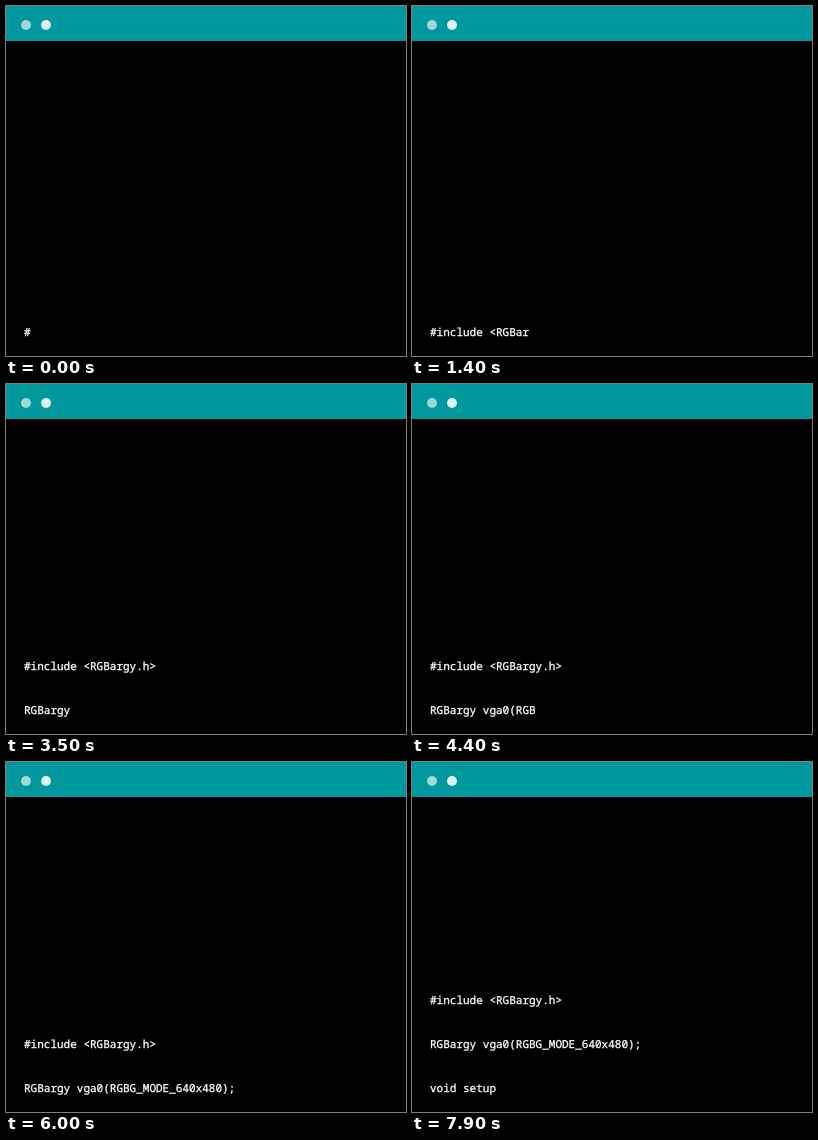
Animation, 400 px wide and 350 px high, one loop 8000 ms. Source, as an HTML page:

```html
<!DOCTYPE html>
<html lang="en">
<head>
<meta charset="utf-8">
<title>Typing a sketch</title>
<style>
  html, body { margin: 0; width: 100%; height: 100%; overflow: hidden; background: #000; }

  .bar { position: absolute; left: 0; top: 0; width: 400px; height: 35px; background: #00979d; }
  .dot { position: absolute; top: 14px; width: 10px; height: 10px; border-radius: 50%; }
  .dot.dim { left: 15px; background: #9fd7d8; }
  .dot.bright { left: 35px; background: #def2f2; }

  /* The small negative delay keeps every step just ahead of its tick. */
  .code, .line { animation: 8s -10ms infinite; }

  .code {
    position: absolute; left: 18px; top: 316px;
    font: 11px/22px "Noto Sans Mono", "DejaVu Sans Mono", monospace;
    text-rendering: geometricPrecision;
    color: #fff;
    -webkit-text-stroke: 0.3px #fff;
    animation-name: scroll;
    animation-timing-function: step-end;
  }
  .line { position: absolute; left: 0; height: 22px; overflow: hidden; white-space: pre; }
  .include { top: 0; animation-name: type-include; }
  .object { top: 44px; animation-name: type-object; }
  .setup { top: 88px; animation-name: type-setup; }

  @keyframes scroll {
    0% { top: 316px; }
    28.125% { top: 294px; }
    33.75% { top: 272px; }
    79.375% { top: 250px; }
    85%, 100% { top: 228px; }
  }
  /* One character every 100 ms. */
  @keyframes type-include {
    0% { width: 1ch; animation-timing-function: steps(19); }
    23.75%, 100% { width: 20ch; }
  }
  @keyframes type-object {
    0%, 35% { width: 0; animation-timing-function: steps(32); }
    75%, 100% { width: 32ch; }
  }
  @keyframes type-setup {
    0%, 86.25% { width: 0; animation-timing-function: steps(10); }
    98.75%, 100% { width: 10ch; }
  }
</style>
</head>
<body>
  <div class="code">
    <div class="line include">#include &lt;RGBargy.h&gt;</div>
    <div class="line object">RGBargy vga0(RGBG_MODE_640x480);</div>
    <div class="line setup">void setup</div>
  </div>
  <div class="bar">
    <div class="dot dim"></div>
    <div class="dot bright"></div>
  </div>
</body>
</html>
```
